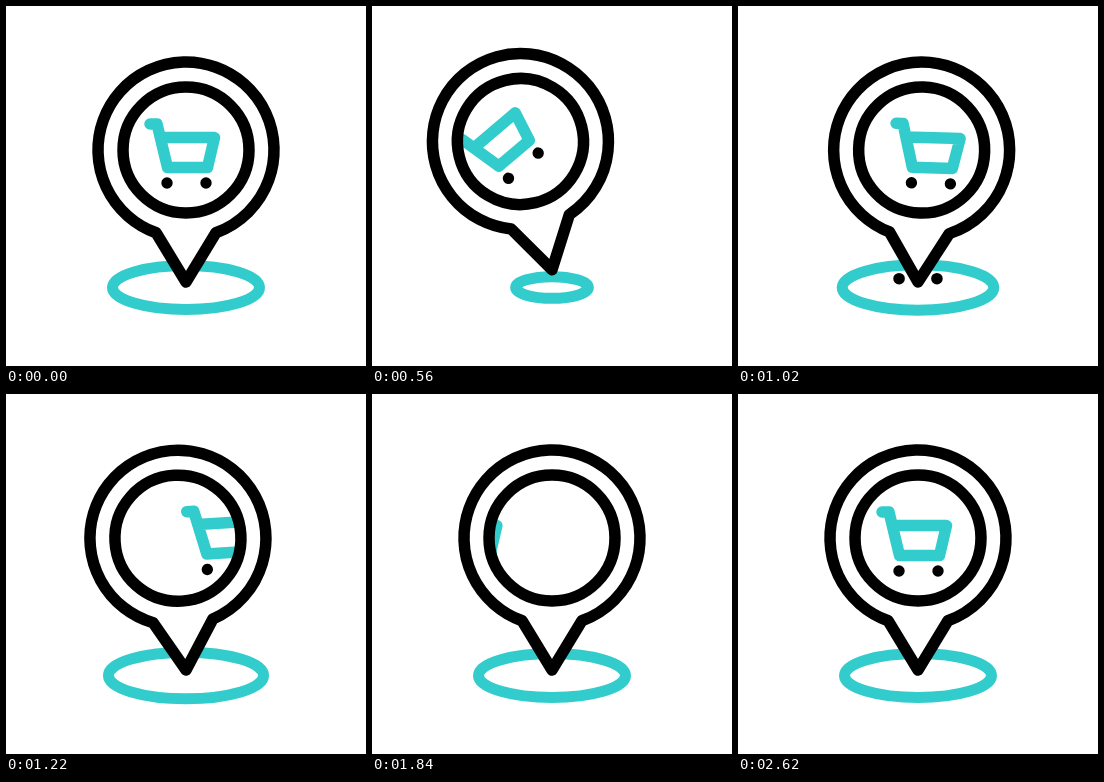
Animation of 360 by 360 pixels, one loop 3.6 s. Source, as an HTML page with a canvas:

```html
<!DOCTYPE html>
<html lang="en">
<head>
<meta charset="utf-8">
<title>Store location pin</title>
<style>
  html, body { margin: 0; width: 100%; height: 100%; overflow: hidden; background: #fff; }
  canvas { display: block; width: 360px; height: 360px; }
</style>
</head>
<body>
<canvas id="stage"></canvas>
<script>
const LOOP = 3600;
const BLACK = '#000', TEAL = '#33cccc';
const canvas = document.getElementById('stage');
const ratio = window.devicePixelRatio || 1;
canvas.width = canvas.height = 360 * ratio;
const ctx = canvas.getContext('2d');

// Keyframes as [time, value], joined by sine easing
const TILT = [[0, 0], [840, -18.4], [1070, 4], [1220, -3.5], [1600, 0]];
const LIFT = [[200, 0], [850, 21], [1010, 0]];
const SHADOW = [[50, 1], [840, 0.3], [1088, 1.18], [1300, 1]];
const WHEELIE = [[0, 0], [420, -26.5], [600, -26.5], [1020, 0]];
const DRIVE_OUT = [[875, 0], [1600, 100]];
const DRIVE_IN = [[1560, -100], [2620, 0]];

const radians = degrees => degrees * Math.PI / 180;

function track(keys, t) {
  if (t <= keys[0][0]) return keys[0][1];
  for (let i = 1; i < keys.length; i++) {
    const [t0, v0] = keys[i - 1], [t1, v1] = keys[i];
    if (t < t1) {
      const p = (t - t0) / (t1 - t0);
      return v0 + (v1 - v0) * (1 - Math.cos(Math.PI * p)) / 2;
    }
  }
  return keys[keys.length - 1][1];
}

function stroke(color, width) {
  ctx.strokeStyle = color;
  ctx.lineWidth = width;
  ctx.stroke();
}

function dot(x, y, r) {
  ctx.beginPath();
  ctx.arc(x, y, r, 0, 2 * Math.PI);
  ctx.fillStyle = BLACK;
  ctx.fill();
}

function drawShadow(t) {
  const s = track(SHADOW, t);
  ctx.beginPath();
  ctx.ellipse(180, 281.5, 73.5 * s, 22 * s, 0, 0, 2 * Math.PI);
  stroke(TEAL, 11);
}

function drawSparks(t) {
  const p = (t - 980) / 220;
  if (p <= 0 || p >= 1) return;
  const spread = 56 * (1 - (1 - p) ** 2);
  const y = 276 - 6 * Math.sin(Math.PI * p);
  for (const side of [-1, 1]) dot(180 + side * spread, y, 6 * (1 - p * p));
}

// Coordinates are relative to the centre of the pin head
function drawCart(t) {
  const shift = t < 1580 ? track(DRIVE_OUT, t) : track(DRIVE_IN, t);
  ctx.save();
  ctx.beginPath();
  ctx.arc(0, 0, 60, 0, 2 * Math.PI);
  ctx.clip();
  ctx.translate(shift - 20, 36);
  ctx.rotate(radians(track(WHEELIE, t)));
  ctx.translate(20, -36);
  ctx.beginPath();
  ctx.moveTo(-36, -26);
  ctx.lineTo(-29, -26);
  ctx.lineTo(-18.5, 17.5);
  ctx.lineTo(21.5, 17.5);
  ctx.lineTo(28.5, -12.5);
  ctx.lineTo(-25.5, -12.5);
  stroke(TEAL, 11.5);
  dot(-19, 33, 5.7);
  dot(20, 33, 5.7);
  ctx.restore();
}

function drawPin(t) {
  const neck = Math.atan2(83, 30);
  ctx.save();
  ctx.translate(180, 276 - track(LIFT, t));
  ctx.rotate(radians(track(TILT, t)));
  ctx.translate(0, -132);
  ctx.beginPath();
  ctx.arc(0, 0, 88, Math.PI - neck, neck);
  ctx.lineTo(0, 132);
  ctx.closePath();
  ctx.fillStyle = '#fff';
  ctx.fill();
  stroke(BLACK, 11.5);
  drawCart(t);
  ctx.beginPath();
  ctx.arc(0, 0, 63, 0, 2 * Math.PI);
  stroke(BLACK, 11.5);
  ctx.restore();
}

function render(t) {
  ctx.setTransform(ratio, 0, 0, ratio, 0, 0);
  ctx.fillStyle = '#fff';
  ctx.fillRect(0, 0, 360, 360);
  ctx.lineCap = ctx.lineJoin = 'round';
  drawShadow(t);
  drawSparks(t);
  drawPin(t);
}

const start = performance.now();
function tick() {
  render((performance.now() - start) % LOOP);
  requestAnimationFrame(tick);
}
tick();
</script>
</body>
</html>
```
